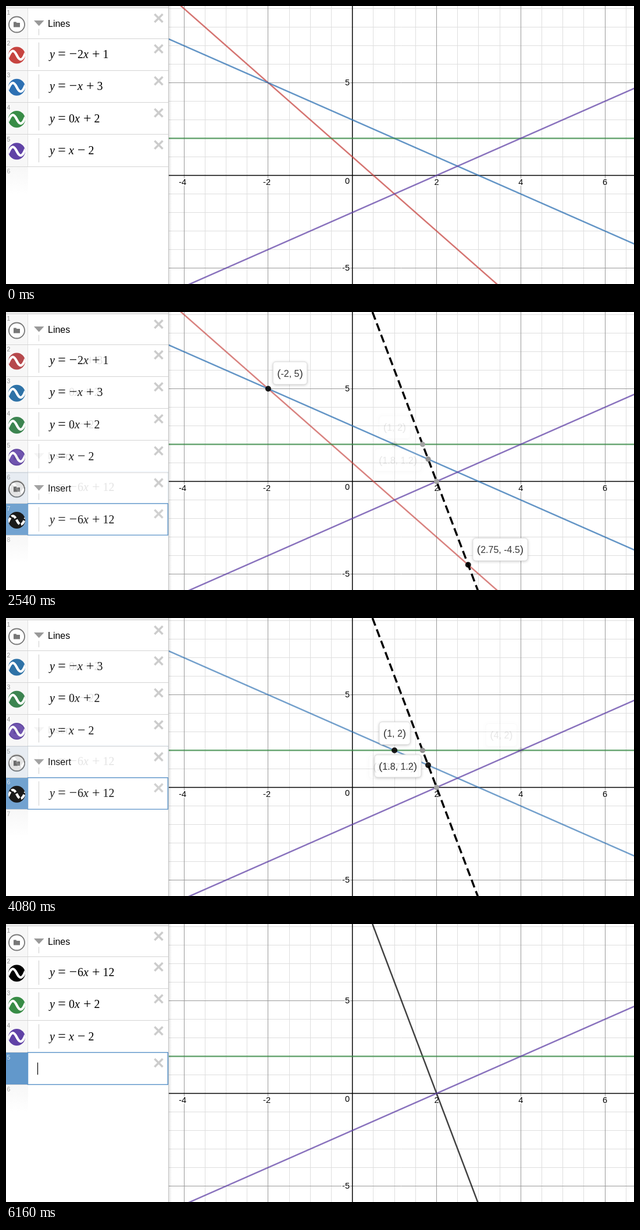
An HTML page with a canvas for the animation above (7660 ms loop, 1080 px wide and 480 px high).

```html
<!DOCTYPE html>
<html lang="en">
<head>
<meta charset="utf-8">
<title>Lines</title>
<style>
html, body { margin: 0; width: 100%; height: 100%; overflow: hidden; background: #fff; }
canvas { display: block; }
</style>
</head>
<body>
<canvas id="stage" width="1080" height="480"></canvas>
<script>
const W = 1080, H = 480, PANEL = 279;
const SANS = '"Liberation Sans", Arial, sans-serif';
const SERIF = '"Liberation Serif", "Times New Roman", serif';
const BLUE = '#6298cb';
const X0 = 595.7, Y0 = 292.5, UX = 72.4, UY = 32;
const px = x => X0 + x * UX;
const py = y => Y0 - y * UY;

const red = { m: -2, b: 1, color: '#c74440', text: '−2x+1' };
const blue = { m: -1, b: 3, color: '#2d70b3', text: '−x+3' };
const green = { m: 0, b: 2, color: '#388c46', text: '0x+2' };
const purple = { m: 1, b: -2, color: '#6042a6', text: 'x−2' };
const solid = { m: -6, b: 12, color: '#000', text: '−6x+12' };
const dashed = { ...solid, dash: true, selected: true };
const lines = { folder: 'Lines' }, insert = { folder: 'Insert' };
const blank = { selected: true };

// tags: [label, centre x, centre y]
const scenes = [
  { rows: [lines, red, blue, green, purple] },
  { rows: [lines, red, blue, green, purple, insert, dashed],
    dots: [[-2, 5], [2.75, -4.5]], faint: [[5 / 3, 2], [1.8, 1.2], [2, 0]],
    tags: [['-2, 5', 488.5, 105.5], ['2.75, -4.5', 850, 410]] },
  { rows: [lines, blue, green, purple, insert, dashed],
    dots: [[1, 2], [1.8, 1.2]], faint: [[5 / 3, 2], [2, 0]],
    tags: [['1, 2', 668.5, 199], ['1.8, 1.2', 674, 255.5]] },
  { rows: [lines, green, purple, insert, dashed],
    dots: [[5 / 3, 2], [4, 2]], faint: [[2, 0]],
    tags: [['1.667, 2', 666.5, 257], ['4, 2', 852, 202]] },
  { rows: [lines, solid, green, purple, blank] }
];

function seg(c, x1, y1, x2, y2, color, width = 1) {
  c.strokeStyle = color;
  c.lineWidth = width;
  c.beginPath();
  c.moveTo(x1, y1);
  c.lineTo(x2, y2);
  c.stroke();
}

function label(c, text, x, y, font, color, align = 'left') {
  c.font = font;
  c.fillStyle = color;
  c.textAlign = align;
  c.fillText(text, x, y);
}

function disc(c, x, y, r, color) {
  c.fillStyle = color;
  c.beginPath();
  c.arc(x, y, r, 0, 7);
  c.fill();
}

function drawGrid(c) {
  const vert = (i, color) => {
    const x = Math.floor(px(i)) + 0.5;
    seg(c, x, 0, x, H, color);
  };
  const horiz = (j, color) => seg(c, PANEL, py(j), W, py(j), color);
  for (let i = -4; i < 7; i += 0.5) if (i % 2) vert(i, '#dedede');
  for (let j = -5; j < 10; j++) if (j % 5) horiz(j, '#dedede');
  for (let i = -4; i < 7; i += 2) vert(i, '#999');
  horiz(5, '#999');
  horiz(-5, '#999');
  seg(c, X0, 0, X0, H, '#000', 1.5);
  seg(c, PANEL, Y0, W, Y0, '#000', 1.5);

  const font = '14.5px ' + SANS;
  const num = (s, x, y, align) => {
    c.strokeStyle = '#fff';
    c.lineWidth = 3;
    c.lineJoin = 'round';
    c.font = font;
    c.textAlign = align;
    c.strokeText(s, x, y);
    label(c, s, x, y, font, '#000', align);
  };
  for (const i of [-4, -2, 2, 4, 6]) num(String(i), px(i) - (i < 0 ? 2.4 : 0), 309, 'center');
  num('0', 591, 307, 'right');
  num('5', 591, 137, 'right');
  num('-5', 591, 457, 'right');
}

function drawGraph(c, { rows, dots = [], faint = [], tags = [] }) {
  c.save();
  c.beginPath();
  c.rect(PANEL, 0, W - PANEL, H);
  c.clip();
  drawGrid(c);
  for (const { m, b, color, dash } of rows.filter(r => r.text)) {
    c.globalAlpha = dash ? 1 : 0.74;
    c.setLineDash(dash ? [14, 7] : []);
    // steep lines are cut at the top and bottom edge
    const xs = Math.abs(m) > 3 ? [(9.14 - b) / m, (-5.9 - b) / m] : [-4.5, 6.8];
    const [p, q] = xs;
    seg(c, px(p), py(m * p + b), px(q), py(m * q + b), color, dash ? 3.5 : 2.5);
  }
  c.globalAlpha = 1;
  c.setLineDash([]);
  for (const [x, y] of faint) disc(c, px(x), py(y), 4.5, '#a3a3a3');
  for (const [x, y] of dots) disc(c, px(x), py(y), 5, '#000');
  for (const tag of tags) drawTag(c, ...tag);
  c.restore();
}

function drawTag(c, text, x, y) {
  const inner = '16px ' + SANS, paren = '19px ' + SANS;
  c.font = paren;
  const pw = c.measureText('(').width;
  c.font = inner;
  const tw = c.measureText(text).width;
  const w = tw + 2 * pw + 14, h = 39;
  c.save();
  c.shadowColor = 'rgba(0,0,0,.28)';
  c.shadowBlur = 5;
  c.shadowOffsetY = 1;
  c.fillStyle = '#fff';
  c.beginPath();
  c.roundRect(x - w / 2, y - h / 2, w, h, 5);
  c.fill();
  c.restore();
  c.strokeStyle = '#d8d8d8';
  c.lineWidth = 1;
  c.stroke();
  const left = x - tw / 2;
  label(c, '(', left - pw, y + 6, paren, '#222');
  label(c, text, left, y + 6, inner, '#222');
  label(c, ')', left + tw, y + 6, paren, '#222');
}

function drawMath(c, text, y) {
  const ital = 'italic 20px ' + SERIF, roman = '20px ' + SERIF, op = '24px ' + SERIF;
  label(c, 'y', 75, y, ital, '#000');
  label(c, '=', 96, y, op, '#000', 'center');
  let x = 108;
  [...text].forEach((ch, i) => {
    if (ch === '+' || ch === '−') {
      const adv = i ? 23.5 : 15;
      label(c, ch, x + adv / 2, y, op, '#000', 'center');
      x += adv;
    } else {
      label(c, ch, x, y, ch === 'x' ? ital : roman, '#000');
      x += 10;
    }
  });
}

function drawWave(c, y, color, dash) {
  c.save();
  c.translate(18.5, y);
  disc(c, 0, 0, 14.5, color);
  c.clip();
  c.strokeStyle = '#fff';
  c.lineWidth = 4.3;
  c.setLineDash(dash ? [9, 3] : []);
  c.beginPath();
  c.moveTo(-15, 4);
  c.bezierCurveTo(-9, -11, -5, -10, 0, 0);
  c.bezierCurveTo(5, 10, 9, 11, 15, -4);
  c.stroke();
  c.restore();
}

function drawFolder(c, name, top) {
  const y = top + 28.5;
  disc(c, 18.5, y, 13.5, '#fff');
  c.strokeStyle = '#777';
  c.lineWidth = 1.8;
  c.stroke();
  c.fillStyle = '#777';
  c.fillRect(13, y - 4.5, 5, 3);
  c.fillRect(13, y - 3, 11, 7.5);
  c.fillStyle = '#999';
  c.beginPath();
  c.moveTo(48, top + 21.5);
  c.lineTo(65.5, top + 21.5);
  c.lineTo(56.7, top + 31);
  c.fill();
  seg(c, 56.5, top + 36, 56.5, top + 47, '#ccc');
  label(c, name, 72, top + 32, '16px ' + SANS, '#000');
}

function drawRow(c, row, n, top, h) {
  const t = Math.round(top), b = Math.round(top + h);
  c.fillStyle = row.selected ? BLUE : '#f7f7f7';
  c.fillRect(0, t, 37, b - t);
  seg(c, 37.5, t, 37.5, b, '#e0e0e0');
  seg(c, 0, b - 0.5, PANEL, b - 0.5, '#d4d4d4');
  if (row.selected) {
    c.strokeStyle = BLUE;
    c.lineWidth = 1.5;
    c.strokeRect(37.5, t - 0.25, 241, b - t - 0.5);
  }
  label(c, n, 1.5, top + 11.5, '10.5px ' + SANS, row.selected ? '#e4eef8' : '#999');
  const y = top + 17.5;
  seg(c, 255.5, y - 7, 269.5, y + 7, '#ccc', 3.6);
  seg(c, 255.5, y + 7, 269.5, y - 7, '#ccc', 3.6);
  if (row.folder) drawFolder(c, row.folder, top);
  else if (row.text) {
    drawWave(c, top + 28.5, row.color, row.dash);
    seg(c, 56.5, t + 6, 56.5, t + 48, '#ccc');
    drawMath(c, row.text, top + 33.5);
  } else seg(c, 54.5, top + 17, 54.5, top + 38, '#000', 1.2);
}

function drawPanel(c, rows) {
  c.fillStyle = '#fff';
  c.fillRect(0, 0, PANEL, H);
  c.fillStyle = '#ececec';
  c.fillRect(0, 0, PANEL, 3);
  seg(c, 0, 3.5, PANEL, 3.5, '#d4d4d4');
  let top = 3.5;
  rows.forEach((row, i) => {
    const h = !i ? 53 : row.folder ? 53.5 : 55.25;
    drawRow(c, row, i + 1, top, h);
    top += h;
  });
  const fade = c.createLinearGradient(0, top, 0, top + 48);
  fade.addColorStop(0, '#f7f7f7');
  fade.addColorStop(1, '#fff');
  c.fillStyle = fade;
  c.fillRect(0, Math.round(top), 38, 48);
  label(c, rows.length + 1, 1.5, top + 11, '10.5px ' + SANS, '#aaa');
  seg(c, PANEL + 0.5, 0, PANEL + 0.5, H, '#c4c4c4');
  const shade = c.createLinearGradient(280, 0, 285, 0);
  shade.addColorStop(0, 'rgba(0,0,0,.1)');
  shade.addColorStop(1, 'rgba(0,0,0,0)');
  c.fillStyle = shade;
  c.fillRect(280, 0, 5, H);
  const selected = rows.find(r => r.selected);
  if (selected) {
    const h = 55.25, y = top - h;
    seg(c, 278.5, y, 278.5, top - 1, BLUE, 1.5);
  }
}

function render(scene) {
  const canvas = document.createElement('canvas');
  canvas.width = W;
  canvas.height = H;
  const c = canvas.getContext('2d');
  c.fillStyle = '#fff';
  c.fillRect(0, 0, W, H);
  drawGraph(c, scene);
  drawPanel(c, scene.rows);
  return canvas;
}

const LOOP = 7660, HOLD = 1000, STEP = 60, STEPS = 10;
const PERIOD = HOLD + STEP * (STEPS - 1);
const views = scenes.map(render);
const ctx = document.getElementById('stage').getContext('2d');
const start = performance.now();

function draw(now) {
  const t = Math.max(0, now - start) % LOOP;
  const i = Math.min(Math.floor(t / PERIOD), views.length - 1);
  const local = t - i * PERIOD;
  const step = Math.floor((local - HOLD) / STEP) + 1;
  ctx.globalAlpha = 1;
  ctx.drawImage(views[i], 0, 0);
  if (step > 0 && i < views.length - 1) {
    ctx.globalAlpha = step / STEPS;
    ctx.drawImage(views[i + 1], 0, 0);
  }
  requestAnimationFrame(draw);
}
draw(start);
</script>
</body>
</html>
```
